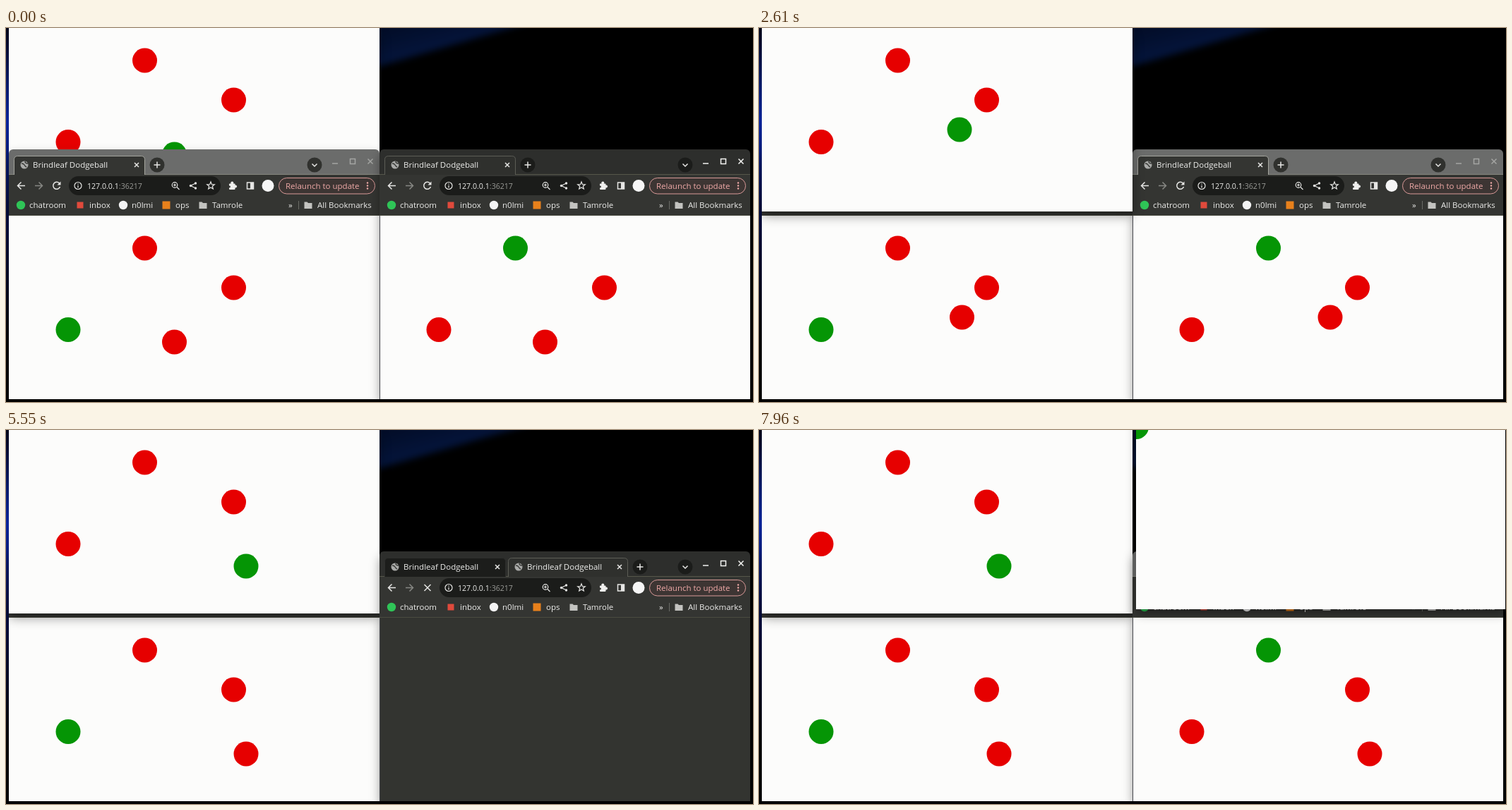
An HTML page for the animation above (7.99 s loop, 1058 by 530 pixels).

```html
<!DOCTYPE html>
<html lang="en">
<head>
<meta charset="utf-8">
<title>Brindleaf Dodgeball</title>
<style>
html, body { margin: 0; width: 100%; height: 100%; overflow: hidden; background: #000; }
#stage { position: absolute; left: 0; top: 0; width: 1058px; height: 530px; overflow: hidden; background: #000; }
#stage div { position: absolute; }
#strip { left: 0; top: 0; width: 4px; height: 530px;
  background: linear-gradient(#010418, #0a1f7a 15%, #0c2ab4 25%, #06104a 48%, #02041c 72%, #000 85%); }
#glow { left: 510px; top: -10px; width: 260px; height: 70px; filter: blur(5px); }
#glow::before { content: ""; position: absolute; inset: 0; clip-path: polygon(0 0, 92% 0, 0 100%);
  background: linear-gradient(165deg, #020a20, #04143a 45%, #02081c 85%); }
.win { border-radius: 6px 6px 0 0; box-shadow: 0 7px 15px -1px rgba(0, 0, 0, .4); }
.page { left: 0; width: 100%; bottom: 0; overflow: hidden; background: #fcfcfb; }
.dot { left: -17.5px; top: -17.5px; width: 35px; height: 35px; border-radius: 50%; background: #e60000; }
.own { background: #059505; }
.chrome { left: 0; top: 0; }
svg { display: block; }
text { font: 11.5px "Open Sans", "Noto Sans", sans-serif; fill: #ececea; }
.i { fill: none; stroke: #e6e6e4; stroke-width: 1.5; }
#menu { left: 663px; top: 195px; width: 243px; height: 256px; z-index: 9; background: #292a2b;
  box-shadow: 0 2px 7px rgba(0, 0, 0, .5); }
</style>
</head>
<body>
<div id="stage">
  <div id="strip"></div>
  <div id="glow"></div>
  <div id="menu"></div>
</div>
<script>
const LOOP = 7990, STEP = 3.5, HEAD = 94;
const RAISE = 700, MENU = 4380, DUPLICATE = 5170, LOADED = 5700, DETACH = 6000, DROP = 7900;
const TITLE = 'Brindleaf Dodgeball';
const stage = document.getElementById('stage');
const menu = document.getElementById('menu');

// ---------- drawing helpers ----------
const text = (x, y, s, extra = '') => `<text x="${x}" y="${y + 4}" ${extra}>${s}</text>`;
const line = (d, extra = '') => `<path class="i" d="${d}" ${extra}/>`;
const disc = (x, y, r, fill) => `<circle cx="${x}" cy="${y}" r="${r}" fill="${fill}"/>`;
const ring = (x, y, r, extra = '') => `<circle class="i" cx="${x}" cy="${y}" r="${r}" ${extra}/>`;
const box = (x, y, w, h, fill, extra = '') =>
  `<rect x="${x}" y="${y}" width="${w}" height="${h}" fill="${fill}" ${extra}/>`;
const cross = (x, y, r, extra) =>
  line(`M${x - r} ${y - r}l${2 * r} ${2 * r}m0 ${-2 * r}l${-2 * r} ${2 * r}`, extra);
const folder = (x, y) =>
  `<path d="M${x - 5.5} ${y - 4.5}h4l1.5 1.5h5.5v8h-11z" fill="#c3c3c0"/>`;
const dots = (x, y, fill) => [-4, 0, 4].map(d => disc(x, y + d, 1.2, fill)).join('');

function globe(x, y) {
  return disc(x, y, 5.5, '#a9aaa8') +
    line(`M${x - 4} ${y - 2}q3 0 4 2t3 3M${x + 1} ${y - 5}q0 3 4 3`, 'style="stroke:#3a3b38"');
}

function tabShape(tab, lit) {
  const { x, w, on } = tab, end = x + w;
  const edge = on ? (lit ? '#5c5d56' : '#a4a59e') : '#2d2e2c';
  const fill = on ? (lit ? '#2f302d' : '#343532') : '#1c1d1b';
  const room = Math.max(0, Math.min(112, w - 46));
  return `<path d="M${x + 0.5} 36V14.5q0-5 5-5H${end - 5.5}q5 0 5 5V36" fill="${fill}" stroke="${edge}"/>` +
    (w > 40 ? globe(x + 15, 22) + cross(end - 12, 22, 3) : '') +
    `<svg x="${x + 27}" y="9" width="${room}" height="26">${text(0, 13, TITLE)}</svg>`;
}

function titleBar(w, tabs, lit) {
  const last = tabs[tabs.length - 1], plus = last.x + last.w + 17;
  const tone = `style="stroke:${lit ? '#f2f2f0' : '#a3a4a2'}"`;
  const knob = lit ? '#1b1c1a' : '#30312e';
  return box(0, 0, w, 36, lit ? '#2d2e2c' : '#6b6c6b') +
    line(`M0 35.5H${w}`, `style="stroke:${lit ? '#55564a' : '#85867e'};stroke-width:1"`) +
    tabs.map(tab => tabShape(tab, lit)).join('') +
    disc(plus, 22, 10.5, knob) + line(`M${plus - 4.5} 22h9m-4.5-4.5v9`) +
    disc(w - 92, 22, 10.5, knob) + line(`M${w - 95.5} 20.5l3.5 3.5 3.5-3.5`) +
    line(`M${w - 67} 20h8`, tone) +
    line(`M${w - 41.5} 13.5h7v7h-7z`, tone) + cross(w - 13, 17, 3.5, tone);
}

function toolBar(w, loading, pill) {
  const y = 51.5, thin = 'style="stroke-width:1.2"', zoom = w - 290, share = w - 264, star = w - 239;
  const ext = w - 208, side = w - 183;
  const starPath = Array.from({ length: 10 }, (_, k) => {
    const r = k % 2 ? 2.4 : 5.6, a = k * Math.PI / 5;
    return `${(star + r * Math.sin(a)).toFixed(1)} ${(y - r * Math.cos(a)).toFixed(1)}`;
  }).join('L');
  return box(0, 36, w, 58, '#343532') + box(0, 93, w, 1, '#4a4b40') +
    line(`M23 ${y}H12.5M17.5 ${y - 5}l-5 5 5 5`) +
    line(`M37 ${y}H47.5M42.5 ${y - 5}l5 5-5 5`, 'style="stroke:#868783"') +
    (loading ? cross(68, y, 4.5) :
      line(`M71.5 ${y - 3.5}A5 5 0 1 0 72.5 ${y + 1.5}`) +
      `<path d="M73.5 ${y - 6}v5h-5z" fill="#e6e6e4"/>`) +
    box(85, 38, w - 310, 27, '#1b1c1a', 'rx="13.5"') +
    ring(98, y, 5, thin) + line(`M98 ${y - 0.5}v3.5M98 ${y - 3}v1.3`, thin) +
    text(111, y, '127.0.0.1<tspan fill="#9a9b97">:36217</tspan>', 'style="font-size:10.6px"') +
    ring(zoom, y - 1, 3.8, thin) + line(`M${zoom + 3} ${y + 2}l3.5 3.5M${zoom - 2} ${y - 1}h4m-2-2v4`, thin) +
    line(`M${share + 3.5} ${y - 3.5}l-7 3.5 7 3.5`, thin) +
    [[3.5, -3.5], [-3.5, 0], [3.5, 3.5]].map(([dx, dy]) => disc(share + dx, y + dy, 1.7, '#e6e6e4')).join('') +
    line(`M${starPath}Z`, thin) +
    box(ext - 5, y - 3, 8.5, 8.5, '#f0f0ee', 'rx="1"') + disc(ext - 0.7, y - 4, 2, '#f0f0ee') +
    disc(ext + 4, y + 1, 2, '#f0f0ee') + disc(ext - 4.5, y + 1.5, 1.4, '#343532') +
    line(`M${side - 4.5} ${y - 4.5}h9v9h-9z`) + box(side, y - 4.5, 4.5, 9, '#e6e6e4') +
    disc(w - 158, y, 8.5, '#f6f6f6') +
    (pill ? box(w - 142.5, 40.5, 136, 22.5, '#3d3533', 'rx="11.2" stroke="#d99a98"') +
      text(w - 133, y, 'Relaunch to update', 'style="fill:#f0aaa8"') : '') +
    dots(w - 17, y, '#f0aaa8');
}

function bookmarks(w) {
  const y = 79;
  return disc(17, y, 6.2, '#2fc457') + text(29, y, 'chatroom') +
    box(96.5, y - 4.5, 9, 9, '#e04a3c') + text(114, y, 'inbox') +
    disc(162, y, 6.2, '#f4f4f4') + text(174, y, 'n0lmi') +
    box(217.5, y - 5.5, 11, 11, '#e8811c') + text(236, y, 'ops') +
    folder(275, y) + text(288, y, 'Tamrole') +
    text(w - 129, y, '»') + line(`M${w - 114.5} 73v12`, 'style="stroke:#6a6b66;stroke-width:1"') +
    folder(w - 101, y) + text(w - 88, y, 'All Bookmarks');
}

function chrome(w, tabs, { lit = false, loading = false, pill = true } = {}) {
  return `<svg width="${w}" height="94" style="border-radius:6px 6px 0 0">` +
    toolBar(w, loading, pill) + titleBar(w, tabs, lit) + bookmarks(w) + '</svg>';
}

const ITEMS = [
  [13, 'New tab to the right'], [31.5, 'Add tab to reading list'], [50, 'Add tab to new group'],
  [69, 'Move tab to another window'], [96.5, 'Reload', 'Ctrl+R'], [115, 'Duplicate'], [134, 'Pin'],
  [153, 'Mute site'], [180, 'Send to your devices'], [207.5, 'Close', 'Ctrl+W'],
  [226, 'Close other tabs'], [245, 'Close tabs to the right']
];

function menuArt(hover) {
  const gray = 'style="fill:#8f908e"';
  return '<svg width="243" height="256">' +
    (hover >= 0 ? box(0, ITEMS[hover][0] - 9.5, 243, 19, '#3d3e40') : '') +
    ITEMS.map(([y, label, key], k) => text(29, y, label, k > 9 ? gray : '') +
      (key ? text(225, y, key, 'text-anchor="end" style="fill:#a5a6a4"') : '')).join('') +
    [82, 166, 193].map(y => box(0, y, 243, 1, '#474844')).join('') +
    '<path d="M233 66l4 3-4 3z" fill="#c8c8c6"/>' +
    line('M9.5 182v-6h9M7 183.5h6M14.5 178h4v6h-4z', 'style="stroke:#b5b6b4;stroke-width:1.1"') + '</svg>';
}

// ---------- windows ----------
function add(parent, cls) {
  const el = document.createElement('div');
  el.className = cls;
  parent.append(el);
  return el;
}

function put(el, x, y) { el.style.transform = `translate(${x}px,${y}px)`; }

function paint(el, html) {
  if (el.html !== html) el.innerHTML = el.html = html;
}

function makeWindow(x, y, w, h, z, top) {
  const el = add(stage, 'win');
  Object.assign(el.style, { left: x + 'px', top: y + 'px', width: w + 'px', height: h + 'px', zIndex: z });
  const head = add(el, 'chrome'), page = add(el, 'page');
  page.style.top = top + 'px';
  return { el, head, page };
}

const PLAYERS = [[192, 45.5], [318, 101.5], [83.5, 161], [234, 178.5]];

function addPlayers(win, own) {
  win.dots = PLAYERS.map(([x, y], k) => {
    const dot = add(win.page, k === own ? 'dot own' : 'dot');
    put(dot, x, y);
    return dot;
  });
}

const topLeft = makeWindow(4, 0, 525, 260, 1, 0);
const lowLeft = makeWindow(4, 172, 525, 354, 2, HEAD);
const lowRight = makeWindow(529, 172, 525, 354, 3, HEAD);
const loose = makeWindow(0, 0, 523, 353, 8, HEAD);
topLeft.el.style.borderRadius = 0;
lowRight.page.style.boxShadow = 'inset 1px 0 #44464c';
addPlayers(topLeft, 3);
addPlayers(lowLeft, 2);
addPlayers(lowRight, 0);
const newcomer = add(lowRight.page, 'dot own');
add(loose.page, 'dot own');

const single = [{ x: 7, w: 186, on: true }];
paint(lowLeft.head, chrome(525, single));
paint(loose.head, chrome(523, [{ x: 177, w: 171, on: true }], { pill: false }));

// ---------- motion ----------
// Arrow-key walk: time, then grid steps right and down from the start.
const WALK = [[1525, 0, 0], [2077, 16, 0], [2110, 16, 0], [2455, 16, -10], [2490, 16, -10], [2904, 4, -10],
  [3147, 4, -10], [3423, 4, -2], [3630, 10, 4], [4283, 29, 4]];
const PULL = [[DETACH, 529, 172], [6250, 527, 140], [6450, 523, 114], [6990, 521, 101], [7220, 522, 80],
  [7500, 527, 10], [7800, 533, -92], [DROP, 534, -99]];
const HOVER = [[4480, 0], [4560, 1], [4620, 2], [4680, 3], [4860, 4], [4960, 5]];

function along(keys, t, stepped) {
  if (t <= keys[0][0]) return keys[0].slice(1);
  const k = keys.findIndex(key => key[0] > t);
  if (k < 0) return keys[keys.length - 1].slice(1);
  const [t0, x0, y0] = keys[k - 1], [t1, x1, y1] = keys[k];
  let p = (t - t0) / (t1 - t0);
  const n = Math.max(Math.abs(x1 - x0), Math.abs(y1 - y0));
  if (stepped && n) p = Math.floor(p * n) / n;
  return [x0 + (x1 - x0) * p, y0 + (y1 - y0) * p];
}

function movePlayer(win, t) {
  const [sx, sy] = along(WALK, t, true), [x, y] = PLAYERS[3];
  put(win.dots[3], x + sx * STEP, y + sy * STEP);
}

function render(t) {
  // The other two windows hear of each step a little later.
  movePlayer(topLeft, t);
  movePlayer(lowLeft, t - 33);
  movePlayer(lowRight, t - 15);

  topLeft.el.style.zIndex = t < RAISE ? 1 : 4;
  lowRight.el.style.zIndex = t < MENU ? 3 : 5;

  const open = t >= MENU && t < DUPLICATE;
  menu.style.display = open ? 'block' : 'none';
  if (open) paint(menu, menuArt(HOVER.filter(h => h[0] <= t).length - 1));

  const twin = t >= DUPLICATE && t < DETACH, loading = twin && t < LOADED;
  const grow = Math.min(1, (t - DUPLICATE) / 200);
  const tabs = twin
    ? [{ x: 7, w: Math.round(186 - 14 * grow) }, { x: 182, w: Math.round(20 + 150 * grow), on: true }]
    : single;
  const lit = t < RAISE || (t >= MENU && t < DROP);
  paint(lowRight.head, chrome(525, tabs, { lit, loading }));
  lowRight.page.style.background = loading ? '#333430' : '';
  lowRight.dots.forEach(dot => { dot.style.display = twin ? 'none' : ''; });
  newcomer.style.display = twin && !loading ? '' : 'none';

  loose.el.style.display = t >= DETACH ? '' : 'none';
  const [x, y] = along(PULL, t);
  put(loose.el, Math.round(x), Math.round(y));
}

const start = performance.now();
function tick() {
  render((performance.now() - start) % LOOP);
  requestAnimationFrame(tick);
}
tick();
</script>
</body>
</html>
```
